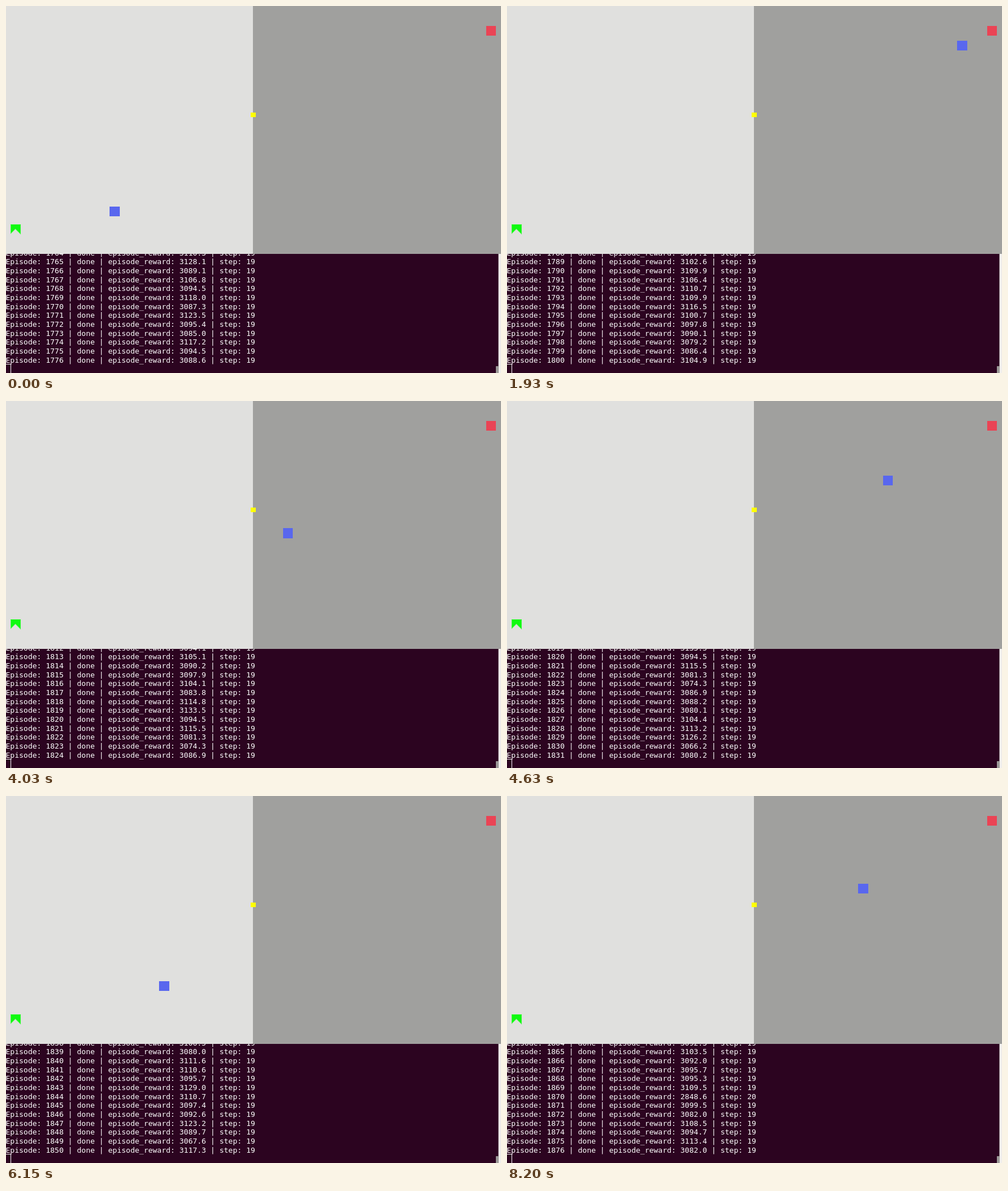
An HTML page for the animation above (8220 ms loop, 870 by 644 pixels).

```html
<!DOCTYPE html>
<html lang="en">
<head>
<meta charset="utf-8">
<title>Training run</title>
<style>
  html, body { margin: 0; width: 100%; height: 100%; overflow: hidden; }
  svg { display: block; width: 100vw; height: 100vh; }
  rect { shape-rendering: crispEdges; }
  text { font: 13px "DejaVu Sans Mono", monospace; fill: #fff; }
</style>
</head>
<body>
<svg viewBox="0 0 870 644">
  <rect y="435" width="870" height="209" fill="#2c0420"/>
  <g id="log"></g>
  <path d="M0 628.5H8.5V644" fill="none" stroke="#fff"/>
  <path d="M865.5 435H870V644H865.5Z" fill="#f0eeec"/>
  <rect x="861" y="632" width="5" height="12" fill="#9b9997"/>
  <rect width="434" height="435" fill="#e0e0de"/>
  <rect x="434" width="436" height="435" fill="#a0a09e"/>
  <path d="M8 383H26V401L16.5 391.5L8 400Z" fill="#48f848"/>
  <path d="M9 384H25V399L16.5 390.5L9 398Z" fill="#10fa10"/>
  <rect x="844" y="35" width="17" height="17" fill="#ea4455"/>
  <rect x="430" y="187" width="9" height="8" fill="#ff0"/>
  <rect id="agent" width="17.4" height="17.4" fill="#5967ee"/>
</svg>
<script>
const LOOP = 8220, TICKS = 247, ROWS = 13, ROW_HEIGHT = 15.68;
const START = { x: 8.2, y: 383 }, CELL = 43.5, MAX_X = 852.6;
const log = document.getElementById("log");
const agent = document.getElementById("agent");

// Episodes in which the agent misses the goal at first.
const misses = { 1862: { step: 24, reward: 3001.7 }, 1870: { step: 20, reward: 2848.6 } };
const lastStep = episode => misses[episode]?.step ?? 19;

function random(seed) {
  return Math.abs(Math.sin(seed * 127.1) * 43758.5) % 1;
}

// Rewards cluster around 3104.
function reward(episode) {
  const spread = random(episode) + random(episode + 0.3) + random(episode + 0.7) - 1.5;
  return (misses[episode]?.reward ?? 3104 + 30 * spread).toFixed(1);
}

const lines = Array.from({ length: ROWS }, (_, i) => {
  const line = document.createElementNS("http://www.w3.org/2000/svg", "text");
  line.setAttribute("x", -0.5);
  line.setAttribute("y", 453.2 + (i - 1) * ROW_HEIGHT);
  return log.appendChild(line);
});

// Ticks come three per 100 ms, at uneven offsets.
function tickAt(t) {
  const m = t % 100;
  const tick = 3 * Math.floor(t / 100) + (m >= 30) + (m >= 50) + (m >= 80);
  return t >= LOOP - 20 ? TICKS : tick;
}

// [tick, episodes finished]; the fraction is the share of the current one.
const pace = [[0, 1776.2], [58, 1800.9], [87, 1810.55], [121, 1824.55],
  [156, 1838.6], [215, 1862.5], [TICKS, 1876.7]];

function progress(tick) {
  const i = Math.max(1, pace.findIndex(p => p[0] >= tick));
  const [[n0, p0], [n1, p1]] = [pace[i - 1], pace[i]];
  return p0 + (p1 - p0) * (tick - n0) / (n1 - n0);
}

// The climb steepens, then runs straight to the goal.
function climb(step) {
  const bend = Math.min(step, 9.85);
  return 3.8 * bend + 0.985 * bend * bend + 23.2 * (step - bend);
}

function render(t) {
  const p = progress(tickAt(t));
  const done = Math.floor(p);
  const step = Math.floor((p - done) * (lastStep(done + 1) + 1) + 0.01);
  agent.setAttribute("x", Math.min(MAX_X, START.x + CELL * step));
  agent.setAttribute("y", Math.max(0, START.y - climb(step)));
  lines.forEach((line, i) => {
    const episode = done - ROWS + 1 + i;
    const label = `Episode: ${episode} | done | episode_reward: ${reward(episode)} | step: ${lastStep(episode)}`;
    if (line.textContent !== label) line.textContent = label;
  });
}

const start = performance.now();
function loop() {
  render((performance.now() - start) % LOOP);
  requestAnimationFrame(loop);
}
render(0);
requestAnimationFrame(loop);
</script>
</body>
</html>
```
